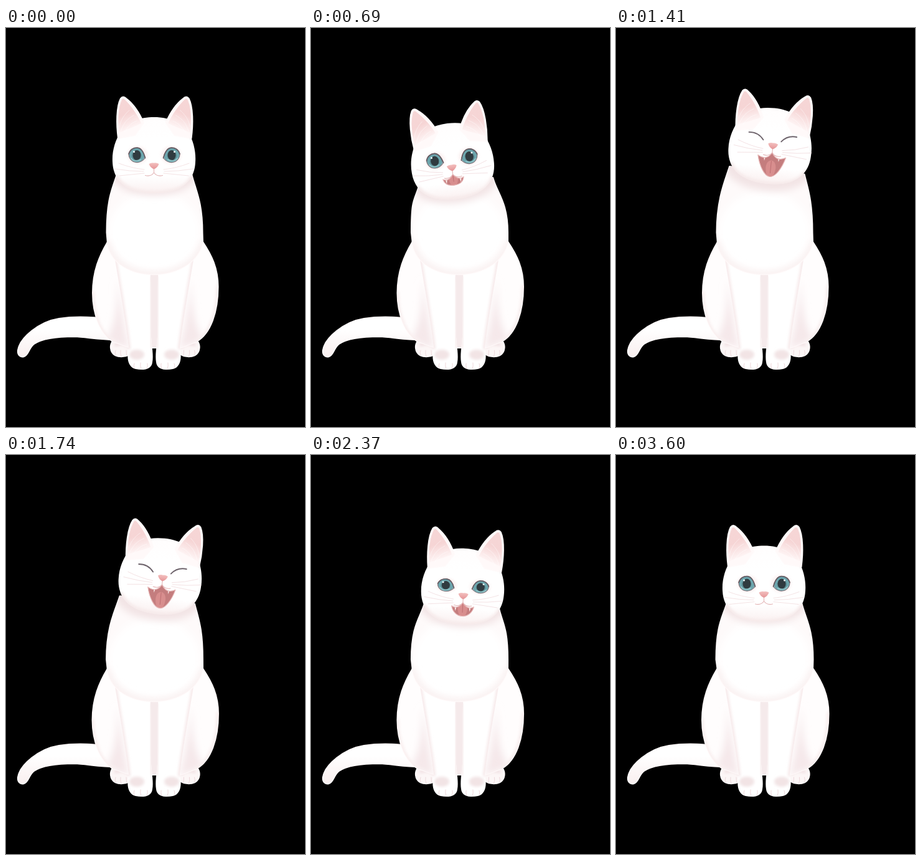
Animation of 480 by 640 pixels, one loop 3660 ms. Source, as an HTML page:

```html
<!DOCTYPE html>
<html lang="en">
<head>
<meta charset="utf-8">
<title>White cat</title>
<style>
  html, body { margin: 0; width: 100%; height: 100%; overflow: hidden; background: #000; }
  svg { display: block; width: 480px; height: 640px; }
  .line { fill: none; stroke-linecap: round; stroke-linejoin: round; }
  .rim { stroke: #fffafa; stroke-width: 2; stroke-linejoin: round; }
</style>
</head>
<body>
<svg viewBox="0 0 480 640">
  <defs>
    <filter id="soft" x="-50%" y="-50%" width="200%" height="200%"><feGaussianBlur stdDeviation="6"/></filter>
    <filter id="fine" x="-50%" y="-50%" width="200%" height="200%"><feGaussianBlur stdDeviation="2"/></filter>
    <linearGradient id="skin" x1="0" y1="0" x2="0" y2="1">
      <stop offset="0" stop-color="#fffdfd"/><stop offset=".3" stop-color="#fff"/>
      <stop offset=".78" stop-color="#fff"/><stop offset="1" stop-color="#faf0f0"/>
    </linearGradient>
    <linearGradient id="earPink" x1="0" y1="0" x2=".25" y2="1">
      <stop offset="0" stop-color="#f6d6d6"/><stop offset=".5" stop-color="#f6d5d5"/>
      <stop offset="1" stop-color="#fff8f8"/>
    </linearGradient>
    <linearGradient id="tailTone" x1="0" y1="0" x2="0" y2="1">
      <stop offset=".3" stop-color="#fff"/><stop offset="1" stop-color="#f9efef"/>
    </linearGradient>
    <radialGradient id="iris" cx=".5" cy=".55" r=".55">
      <stop offset=".3" stop-color="#4a747d"/><stop offset=".7" stop-color="#71acb3"/>
      <stop offset="1" stop-color="#588893"/>
    </radialGradient>
    <linearGradient id="noseTone" x1="0" y1="0" x2="0" y2="1">
      <stop offset="0" stop-color="#f3c0bf"/><stop offset="1" stop-color="#e59496"/>
    </linearGradient>

    <path id="bodyShape" d="M163 343C150 365 139 390 139 425C139 460 152 492 172 503L200 513H280L306 503C329 490 340.500 455 340.500 415C340.500 385 330 364 316 343Z"/>
    <path id="legShape" d="M174 366C183 420 192 470 197 513C193 530 196 544 208 547C222 550 234 547 235 536C237 525 234 510 233 495C232 460 233 430 232 396Z"/>
    <path id="skullShape" d="M238 143C262 143 282 152 292 165C302 183 305 200 304 215C303 242 285 265 238 265C190 265 172 242 171 215C170 198 175 180 185 165C195 150 215 143 238 143Z"/>
    <path id="eyeShape" d="M197 202C199 195 205 191.500 211 192C217 192.500 221 199 223.500 208.500C219 214 214 216 209 215.500C202 215 197 209 197 202Z"/>
    <clipPath id="bodyClip"><use href="#bodyShape"/></clipPath>
    <clipPath id="legClip"><use href="#legShape"/></clipPath>
    <clipPath id="skullClip"><use href="#skullShape"/></clipPath>
    <clipPath id="eyeClip"><use href="#eyeShape"/></clipPath>
    <clipPath id="neckClip"><path class="neck"/></clipPath>
    <clipPath id="mouthClip"><path class="mouth"/></clipPath>

    <g id="leg">
      <use href="#legShape" fill="#fff"/>
      <g clip-path="url(#legClip)">
        <path d="M174 366C183 420 192 470 197 513" class="line" stroke="#f6e8e9" stroke-width="6" filter="url(#fine)"/>
        <path d="M232 400C233 430 231 470 234 512" class="line" stroke="#f8eeee" stroke-width="5" filter="url(#fine)"/>
        <ellipse cx="210" cy="524" rx="12" ry="8" fill="#f2e4e5" filter="url(#fine)"/>
        <path d="M206 538Q204 542 206 546M216 537Q215 542 217 547M227 538Q228 542 226 546" class="line" stroke="#eed6d9"/>
      </g>
    </g>
    <g id="backPaw">
      <path d="M173 500C165 508 167 520 175 525C184 529 195 527 200 522L205 500Z" fill="#fcf6f6" class="rim"/>
      <path d="M176 517Q174 521 176 525M184 517Q183 522 185 527M193 517Q193 522 194 526" class="line" stroke="#eedadd"/>
      <path d="M176 508Q188 503 199 512" class="line" stroke="#f1e1e3" stroke-width="5" filter="url(#fine)"/>
    </g>
    <g id="ear">
      <path d="M180 177C177 155 177 126 184 113Q188 108 193 113C205 122 215 138 221 152L207 172Z" fill="#fff9f9" class="rim"/>
      <path d="M182 168C179 150 180 128 186 115Q188 112 191 115C201 125 212 140 217 153C208 158 195 162 182 168Z" fill="url(#earPink)"/>
      <path d="M184 166C190 150 195 146 205 140M190 167C197 156 202 152 210 149M182 158C185 146 190 139 198 132" class="line" stroke="#fff" stroke-width=".8" opacity=".55"/>
    </g>
    <g id="eye">
      <use href="#eyeShape" fill="#8fb5bb"/>
      <g clip-path="url(#eyeClip)">
        <circle cx="209.500" cy="204" r="12.500" fill="url(#iris)"/>
        <ellipse cx="210" cy="204" rx="6.500" ry="8" fill="#303b40" filter="url(#blur)"/>
        <path d="M201 209Q206 216 216 211" class="line" stroke="#a5d9db" stroke-width="2" opacity=".6"/>
        <circle cx="205.500" cy="198.500" r="1.500" fill="#eefafa"/>
      </g>
      <use href="#eyeShape" class="line" stroke="#85777d" stroke-width="1.100"/>
      <path d="M197 202C199 195 205 191.500 211 192C217 192.500 221 199 223.500 208.500" class="line" stroke="#665a61" stroke-width="1.600"/>
    </g>
    <path id="shut" d="M199 203Q214 201.500 223 213" class="line" stroke="#6d636b" stroke-width="1.900"/>
    <path id="whisker" d="M222 227Q202 225 181 217M221 230Q199 230 175 226M222 233Q202 235 182 237" class="line" stroke="#f1dcde" stroke-width=".8"/>
  </defs>

  <path d="M165 467C130 462 105 463 85 466C53 471 22 497 19 517C18 525 24 529 29 527C37 524 36 514 45 507C58 498 85 495 110 495C130 496 150 500 175 500Z" fill="url(#tailTone)" class="rim"/>

  <use href="#backPaw"/>
  <use href="#backPaw" transform="translate(478.500) scale(-1 1)"/>
  <g id="body">
    <use href="#bodyShape" fill="#fffdfd" class="rim"/>
    <g clip-path="url(#bodyClip)">
      <path d="M178 400C184 440 190 480 198 515L160 500C175 480 180 445 178 400M298 400C294 440 288 480 278 515L318 500C302 480 298 445 298 400" fill="#f5e8ea" filter="url(#soft)"/>
      <path d="M139 425C139 460 152 492 172 503M340 415C340 455 328 490 306 503" class="line" stroke="#f9efef" stroke-width="6" filter="url(#fine)"/>
      <rect x="226" y="380" width="24" height="140" fill="#f5eaeb"/>
    </g>
  </g>
  <use href="#leg"/>
  <use href="#leg" transform="translate(476) scale(-1 1)"/>

  <path class="neck rim" fill="#fefafa"/>
  <g clip-path="url(#neckClip)">
    <ellipse cx="238" cy="328" rx="74" ry="66" fill="#fff" filter="url(#soft)"/>
    <path d="M162 346C176 412 298 412 317 346" class="line" stroke="#f8eeee" stroke-width="9" filter="url(#soft)"/>
    <g class="head"><ellipse cx="238" cy="232" rx="70" ry="37" fill="#f2e4e5" filter="url(#soft)"/></g>
  </g>

  <g class="head">
    <g id="skull">
      <use href="#skullShape" fill="url(#skin)"/>
      <g clip-path="url(#skullClip)">
        <path d="M178 240C188 258 210 265 238 265S290 258 298 240" class="line" stroke="#f6eaea" stroke-width="7" filter="url(#fine)"/>
      </g>
    </g>
    <g id="ears">
      <use href="#ear"/>
      <use href="#ear" transform="translate(477.500) scale(-1 1)"/>
    </g>
    <g id="eyes">
      <g fill="#f9e8e8" filter="url(#fine)" opacity=".6">
        <ellipse cx="211" cy="204" rx="16" ry="14"/><ellipse cx="265" cy="204" rx="16" ry="14"/>
      </g>
      <use href="#eye"/>
      <use href="#eye" transform="translate(476) scale(-1 1)"/>
    </g>
    <g id="face">
      <g fill="#fff" filter="url(#fine)">
        <ellipse cx="225" cy="230" rx="15" ry="9"/><ellipse cx="250" cy="230" rx="15" ry="9"/>
      </g>
      <use href="#whisker"/>
      <use href="#whisker" transform="translate(475) scale(-1 1)"/>
      <g id="closed">
        <use href="#shut" x="-2"/>
        <use href="#shut" transform="translate(473) scale(-1 1)"/>
      </g>
      <g transform="translate(237.500 221)">
        <g id="jaw">
          <path class="mouth" fill="#c47d7e"/>
          <g clip-path="url(#mouthClip)">
            <g id="tongue">
              <path d="M-8 2C-8 -14 8 -14 8 2C7 12 5 17 0 17S-7 12 -8 2Z" fill="#d88e8e"/>
              <path d="M0 -9V10" class="line" stroke="#bd6e72"/>
            </g>
            <path d="M-13 18L-11.500 25L-10 18ZM13 18L11.500 25L10 18Z" fill="#fff5f3"/>
          </g>
          <path class="mouth line" stroke="#e7b8b8" stroke-width="1.200"/>
        </g>
        <path d="M0 4V11Q-5 18 -14 15.500M0 11Q5 18 14 15.500" class="line" stroke="#e3b4b5" stroke-width="1.100"/>
        <path d="M-8 -3Q-4 -5.500 0 -4.500Q4 -5.500 8 -3Q6 3 0 5.500Q-6 3 -8 -3Z" fill="url(#noseTone)"/>
      </g>
    </g>
  </g>
</svg>
<script>
const LOOP = 3660, STEPS = 65;
// step, ear midpoint x, y, tilt, face shift x, y, mouth, breath
const poses = [
  [0, 238.5, 110, 0, 0, 0, 0, 0],
  [6, 214, 133, -9.5, 0, 0, 0, .5],
  [17, 217.5, 115.5, -6.2, -4, -17, .75, .5],
  [25, 256, 103, 6, 6, -25, 1.05, 0],
  [29, 256, 103, 6, 6, -25, 1.05, .3],
  [36, 258, 124, 5.8, 4, -5, .92, 1],
  [49, 238.5, 110, 0, 0, 0, .08, 0],
  [64, 238.5, 112.5, 0, 0, 0, 0, 1],
  [65, 238.5, 110, 0, 0, 0, 0, 0]
];
const $ = s => document.querySelector(s);
const each = (s, name, value) =>
  document.querySelectorAll(s).forEach(e => e.setAttribute(name, value));
const ease = (a, b, x) => {
  const k = Math.min(1, Math.max(0, (x - a) / (b - a)));
  return k * k * (3 - 2 * k);
};
const startOf = i => Math.round(i * 122 / STEPS) * 30;

function stepAt(t) {
  let i = Math.min(STEPS - 1, Math.floor(t * STEPS / LOOP) + 1);
  while (startOf(i) > t) i--;
  return i;
}

function poseAt(i) {
  const n = poses.findIndex(p => p[0] > i);
  const a = poses[n - 1], b = poses[n], k = ease(a[0], b[0], i);
  return a.map((v, j) => v + (b[j] - v) * k);
}

function neckPath(x, y, tilt, breath) {
  const r = tilt * Math.PI / 180, c = Math.cos(r), s = Math.sin(r);
  const at = (px, py) => [x + px * c - py * s, y + px * s + py * c];
  const [lx, ly] = at(-61, 126), [rx, ry] = at(60, 126);
  const left = 161.5 - breath, right = 315.5 + breath;
  return `M${lx} ${ly}C${lx - 7} ${ly + 22} ${left} 274 ${left} 328L163 346` +
    `C174 412 300 412 316 344L${right} 328C${right} 278 ${rx + 6} ${ry + 24} ${rx} ${ry}Z`;
}

function mouthPath(m) {
  const w = 13 + 9 * m, b = 14 + 34 * m, side = 18 + 15 * m, pad = 20 + 5 * m;
  return `M${-w} 17Q-8 ${pad} 0 11Q8 ${pad} ${w} 17` +
    `C${w - 4 * m} ${side} 9 ${b} 0 ${b}S${4 * m - w} ${side} ${-w} 17Z`;
}

function draw(i) {
  const [, x, y, tilt, fx, fy, mouth, breath] = poseAt(i);
  const lid = ease(18, 22, i) - ease(39, 43, i);
  const shift = `translate(${fx * .3} ${fy * .3})`;
  each('.head', 'transform', `translate(${x} ${y}) rotate(${tilt}) translate(-238.5 -110)`);
  each('.neck', 'd', neckPath(x, y, tilt, breath));
  each('.mouth', 'd', mouthPath(mouth));
  $('#skull').setAttribute('transform', shift);
  $('#ears').setAttribute('transform', `translate(${fx * .3} 0)`);
  $('#face').setAttribute('transform', `translate(${fx} ${fy})`);
  $('#body').setAttribute('transform', `translate(239 0) scale(${1 + .01 * breath} 1) translate(-239 0)`);
  $('#eyes').setAttribute('transform',
    `translate(${fx * .3} ${fy * .7 + 208}) scale(1 ${Math.max(.01, 1 - lid)}) translate(0 -208)`);
  $('#eyes').setAttribute('opacity', lid < .85 ? 1 : 0);
  $('#closed').setAttribute('opacity', lid < .85 ? 0 : 1);
  $('#jaw').setAttribute('opacity', Math.min(1, mouth * 8));
  $('#tongue').setAttribute('transform', `translate(0 ${-2 + 34 * mouth})`);
}

let shown = -1;
function tick() {
  const i = stepAt(performance.now() % LOOP);
  if (i !== shown) draw(shown = i);
  requestAnimationFrame(tick);
}
tick();
</script>
</body>
</html>
```
